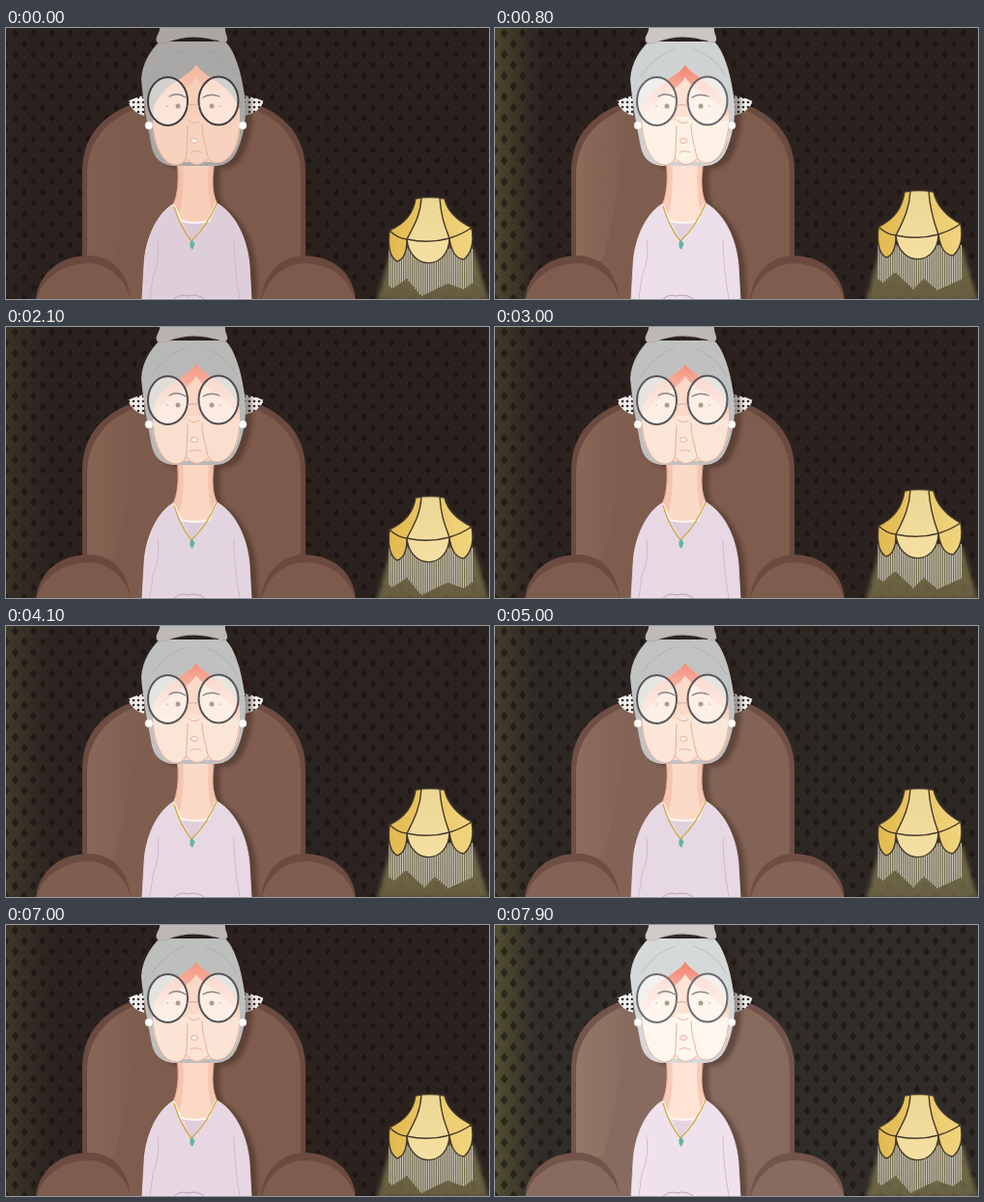
An HTML page that plays this animation: 500x281 px, repeating every 8 s.

```html
<!DOCTYPE html>
<html lang="en">
<head>
<meta charset="utf-8">
<title>Evening by the lamp</title>
<style>
html,body{margin:0;width:100%;height:100%;overflow:hidden;background:#29201e}
svg{display:block;width:100vw;height:100vh}
.line{fill:none;stroke-linecap:round;stroke-linejoin:round}
.wall{fill:var(--wall)}
.chair{fill:var(--chair)}
.rim{fill:var(--rim)}
.hair{fill:var(--hair)}
.bun{fill:var(--bun)}
.skin{fill:var(--skin)}
.cheek{fill:var(--cheek)}
.dress{fill:var(--dress)}
.lens{fill:#fffdf8;stroke:var(--frame);stroke-width:2}
.crease{stroke:#e2a996;stroke-width:.9}
</style>
</head>
<body>
<svg viewBox="0 0 500 281" preserveAspectRatio="none">
<defs>
  <pattern id="paper" width="19" height="22" patternUnits="userSpaceOnUse">
    <g fill="#181110" stroke="#4a3f3a" stroke-width=".7" stroke-opacity=".5">
      <path d="M9.5 0L13.5 5.5L9.5 11L5.5 5.5Z"/>
      <path d="M0 11L4 16.5L0 22L-4 16.5ZM19 11L23 16.5L19 22L15 16.5Z"/>
    </g>
  </pattern>
  <pattern id="lace" width="5" height="5" patternUnits="userSpaceOnUse">
    <rect width="5" height="5" fill="#f1eeec"/>
    <circle cx="2" cy="2" r="1.3" fill="#2f2827"/>
  </pattern>
  <linearGradient id="glowFill">
    <stop stop-color="#5d5a34" stop-opacity=".85"/>
    <stop offset=".35" stop-color="#54512f" stop-opacity=".6"/>
    <stop offset="1" stop-color="#45412a" stop-opacity="0"/>
  </linearGradient>
  <linearGradient id="sheen">
    <stop stop-color="#b5a184" stop-opacity=".26"/>
    <stop offset="1" stop-color="#b5a184" stop-opacity="0"/>
  </linearGradient>
  <linearGradient id="beam" x2="0" y2="1">
    <stop stop-color="#8f8554" stop-opacity=".75"/>
    <stop offset="1" stop-color="#8d8456" stop-opacity=".6"/>
  </linearGradient>
  <linearGradient id="flush" x2="0" y2="1">
    <stop stop-color="#ee6b55"/>
    <stop offset=".5" stop-color="#f49a88" stop-opacity=".85"/>
    <stop offset="1" stop-color="#f7b9a9" stop-opacity=".5"/>
  </linearGradient>
  <linearGradient id="gold">
    <stop stop-color="#e2b94f"/><stop offset="1" stop-color="#f0d57f"/>
  </linearGradient>
  <linearGradient id="cream" x2="0" y2="1">
    <stop stop-color="#ecd694"/><stop offset="1" stop-color="#f5e0a2"/>
  </linearGradient>
  <filter id="soft" x="-10%" y="-10%" width="120%" height="120%"><feGaussianBlur stdDeviation="2"/></filter>
  <path id="hairShape" d="M140 53C141 36 150 23 159 14H227C236 23 243 42 247 70C250 92 246 114 238 130Q232 142 218 143H172Q155 141 151 124C147 102 142 78 140 53Z"/>
  <path id="dressShape" d="M174 182C156 192 144 220 143 246L141 281H254L252 246C250 220 238 192 217 181Z"/>
  <path id="neckShape" d="M177 130C180 158 177 176 173 183L181 200Q196 203 210 200L218 181C212 168 214 150 216 130Z"/>
</defs>

<rect class="wall" width="500" height="281"/>
<rect id="glow" width="50" height="281" fill="url(#glowFill)"/>
<rect width="500" height="281" fill="url(#paper)" opacity=".6"/>

<!-- armchair -->
<path class="rim" d="M79 281V146C80 110 103 88 134 78H256C286 88 309 110 310 146V281Z"/>
<path class="chair" d="M84 281V149C85 116 107 93 137 83H253C282 93 304 116 305 149V281Z"/>
<path id="sheenShape" d="M84 245V149C85 116 107 93 137 83Q132 165 112 240Z" fill="url(#sheen)"/>
<path d="M126 76Q134 72 143 70V91Q131 88 126 76ZM267 76Q258 72 247 70V91Q262 88 267 76Z" fill="url(#lace)"/>
<g transform="translate(7 3)" filter="url(#soft)" fill="#2e1b18" opacity=".42">
  <use href="#hairShape"/><use href="#neckShape"/><use href="#dressShape"/>
</g>
<path class="rim" d="M31 281C34 253 57 236 86 236C111 237 126 254 129 281Z"/>
<path class="chair" d="M32 281C37 260 59 244 86 244C108 245 124 261 129 281Z"/>
<path class="rim" d="M264 281C267 254 285 236 310 236C340 237 359 255 362 281Z"/>
<path class="chair" d="M265 281C270 261 287 244 310 244C337 245 355 260 361 281Z"/>

<!-- body -->
<use href="#dressShape" class="dress" stroke="#f2e6ee" stroke-width=".8"/>
<path class="line" d="M157 220Q160 240 152 258L149 281M236 220Q236 246 242 281" stroke="#cfb6c9" stroke-width=".9"/>
<path class="line" d="M174 281Q181 275 188 278Q198 275 205 281" stroke="#b99db2" stroke-width="1"/>
<path d="M176 187L193 221L214 187Z" fill="#d3c1d1" opacity=".45"/>
<use href="#neckShape" class="skin"/>
<path d="M177 132C180 158 177 176 173 183L179 194C185 176 184 150 183 138ZM216 132C213 155 213 170 218 181L213 190C208 172 209 150 210 138Z" fill="#f0aa94" opacity=".45"/>
<path class="line crease" d="M177 140C180 160 177 176 173 183M216 138C213 158 213 170 218 181"/>
<path class="line" d="M174 184L181 200Q196 204 210 200L217 183" stroke="#fbf6f2" stroke-width="2.2"/>
<path class="line" d="M174 185Q181 208 192 221Q208 206 218 182" stroke="#cfa943" stroke-width="1.3"/>
<path d="M190.5 222L193 220L195.5 224L193 230L190.5 227Z" fill="#62b59c"/>

<!-- hair and face -->
<use href="#hairShape" class="hair"/>
<path class="bun" d="M159 -2C160 6 154 8 156 14Q160 19 166 15Q192 5 219 13Q226 18 229 13C230 8 226 6 227 -2Z"/>
<path class="line" d="M157 16Q166 17 174 12Q193 6 211 11Q221 17 229 14M151 50Q166 28 186 22M206 22Q229 30 239 50M241 117Q236 137 221 140" stroke="#8d8c8c" stroke-width=".7" opacity=".5"/>
<path class="skin" d="M197 38C189 52 161 57 152 85V106C154 124 162 138 177 139H220C235 137 242 120 242 103V85C233 57 205 52 197 38Z"/>
<path id="forehead" d="M197 38C189 52 161 57 152 85L153 92C166 72 188 66 197 51C206 66 229 72 241 92L242 85C233 57 205 52 197 38Z" fill="url(#flush)"/>
<path class="cheek" d="M152 96C152 118 160 142 177 142Q187 141 187 128L188 96Z"/>
<path class="cheek" d="M203 96L208 130Q210 141 220 140C235 137 242 118 242 96Z"/>
<path class="cheek" d="M188 92C188 112 186 124 187 135Q196 148 209 136C210 122 204 112 203 92Z"/>
<path class="line crease" d="M152 98C153 120 161 142 177 142Q187 141 187 128L188 102M187 135Q196 148 209 136M203 100C203 114 207 122 208 130Q210 141 220 140C235 137 241 118 242 98"/>
<path class="line crease" d="M189 96Q194 101 200 97M191 129Q196 126 202 129"/>
<ellipse cx="195" cy="117" rx="3.6" ry="2.4" fill="#fff6f0" stroke="#dfa08f" stroke-width=".9"/>

<!-- glasses and eyes -->
<ellipse class="lens" cx="167.5" cy="76" rx="20.5" ry="25"/>
<ellipse class="lens" cx="220" cy="75.5" rx="20.5" ry="25"/>
<path class="line" d="M188 81Q193 78 200 81" stroke="#cbb0a4" stroke-width="1"/>
<path class="line" d="M169 71Q177 66 186 72M204 72Q211 67 221 71" stroke="#8d8184" stroke-width="1.3"/>
<g fill="#aa9c90"><circle cx="178" cy="81" r="2.5"/><circle cx="213" cy="81" r="2.5"/><circle cx="167" cy="81" r=".7"/><circle cx="222" cy="81" r=".7"/></g>
<g fill="#fffdf9" stroke="#ddd4cd" stroke-width=".5"><circle cx="148" cy="101" r="4"/><circle cx="245" cy="101" r="4"/></g>

<!-- lamp -->
<path d="M400 226H483L500 283H384Z" fill="url(#beam)" filter="url(#soft)"/>
<g id="lamp"></g>
</svg>
<script>
const LOOP = 8000, STEP = 100;
const $ = s => document.querySelector(s);
const root = document.documentElement.style;

// time, television light, grey haze over the room
const LIGHT = [
  [0, 0, 0], [800, .86, .1], [2100, .34, 0], [4100, .5, .2],
  [5900, .78, .85], [7000, .46, .1], [7900, 1, 1], [8000, 0, 0]
];
const ROOM = {
  wall: [[42, 33, 31], [48, 44, 41]],
  chair: [[125, 91, 76], [136, 107, 95]],
  rim: [[106, 73, 62], [115, 84, 74]]
};
const FIGURE = {
  hair: [[169, 168, 166], [213, 217, 217]],
  bun: [[170, 166, 164], [207, 203, 201]],
  skin: [[247, 207, 185], [255, 228, 213]],
  cheek: [[247, 211, 191], [255, 247, 238]],
  dress: [[221, 206, 217], [240, 226, 236]],
  frame: [[64, 61, 64], [108, 108, 112]]
};
const mix = (a, b, u) => a + (b - a) * u;

function lightAt(t) {
  const i = LIGHT.findIndex((k, n) => n && t < k[0]);
  const a = LIGHT[i - 1], b = LIGHT[i], u = (t - a[0]) / (b[0] - a[0]);
  const flicker = .1 * Math.sin(t * .0173) * Math.sin(Math.PI * u);
  const level = Math.min(1, Math.max(0, mix(a[1], b[1], u) + flicker));
  return [level, mix(a[2], b[2], u)];
}

function tint(tones, u) {
  for (const [name, [dark, lit]] of Object.entries(tones))
    root.setProperty('--' + name, `rgb(${dark.map((v, i) => Math.round(mix(v, lit[i], u)))})`);
}

function edgeY(points, x) {
  const i = Math.max(1, points.findIndex(p => p[0] >= x));
  const [x0, y0] = points[i - 1], [x1, y1] = points[i];
  return mix(y0, y1, (x - x0) / (x1 - x0));
}

function lampMarkup(top, rim, tips) {
  const y = d => rim + d;
  let strands = '';
  for (let x = 397; x <= 484; x += 2.25) strands += `M${x} ${y(19)}V${edgeY(tips, x)}`;
  const left = `C426 ${top + 14} 415 ${y(-8)} 397 ${y(0)}`;
  const outline = `M424 ${top}Q439 ${top - 3} 454 ${top}C457 ${top + 14} 468 ${y(-10)} 482 ${y(-3)}`
    + `Q486 ${y(20)} 474 ${y(30)}Q462 ${y(29)} 459 ${y(8)}`
    + `C458 ${y(42)} 418 ${y(42)} 415 ${y(9)}Q415 ${y(29)} 405 ${y(32)}`
    + `Q394 ${y(26)} 397 ${y(0)}C415 ${y(-8)} 422 ${top + 14} 424 ${top}Z`;
  const seamL = `M430 ${top - 1}C429 ${top + 16} 424 ${y(-8)} 415 ${y(9)}`;
  const seamR = `M449 ${top - 1}C450 ${top + 16} 453 ${y(-8)} 459 ${y(8)}`;
  const panel = `${seamL}C418 ${y(42)} 458 ${y(42)} 459 ${y(8)}C453 ${y(-8)} 450 ${top + 16} 449 ${top - 1}Z`;
  return `<path d="${strands}" stroke="#c9c5bb" stroke-width="1.15"/>
    <path d="${outline}" fill="url(#gold)"/>
    <path d="${panel}" fill="url(#cream)"/>
    <path class="line" d="${outline}M397 ${y(0)}Q405 ${y(8)} 415 ${y(9)}Q438 ${y(14)} 459 ${y(8)}Q472 ${y(4)} 482 ${y(-3)}${seamL}${seamR}" stroke="#45382a" stroke-width="1.4"/>`;
}
const poses = [
  lampMarkup(177, 210, [[396, 267], [400, 270], [415, 260], [430, 278], [457, 265], [474, 271], [486, 262]]),
  lampMarkup(170, 206, [[396, 260], [402, 264], [414, 253], [433, 271], [444, 260], [458, 272], [486, 259]])
];
let shown = -1;

function draw(t) {
  const [light, haze] = lightAt(t);
  tint(ROOM, haze);
  tint(FIGURE, light);
  $('#glow').style.opacity = .06 + light * .84;
  $('#sheenShape').style.opacity = .25 + light * .75;
  $('#forehead').style.opacity = .25 + Math.sqrt(light) * .6;
  for (const lens of document.querySelectorAll('.lens'))
    lens.style.fillOpacity = .48 + light * .22;

  const phase = Math.round(t / STEP) % 11;
  const pose = phase > 4 && phase < 10 ? 1 : 0;
  if (pose !== shown) $('#lamp').innerHTML = poses[shown = pose];
}

const start = performance.now();
function tick() {
  const t = (performance.now() - start) % LOOP;
  draw(Math.floor(t / STEP) * STEP);
  requestAnimationFrame(tick);
}
draw(0);
requestAnimationFrame(tick);
</script>
</body>
</html>
```
